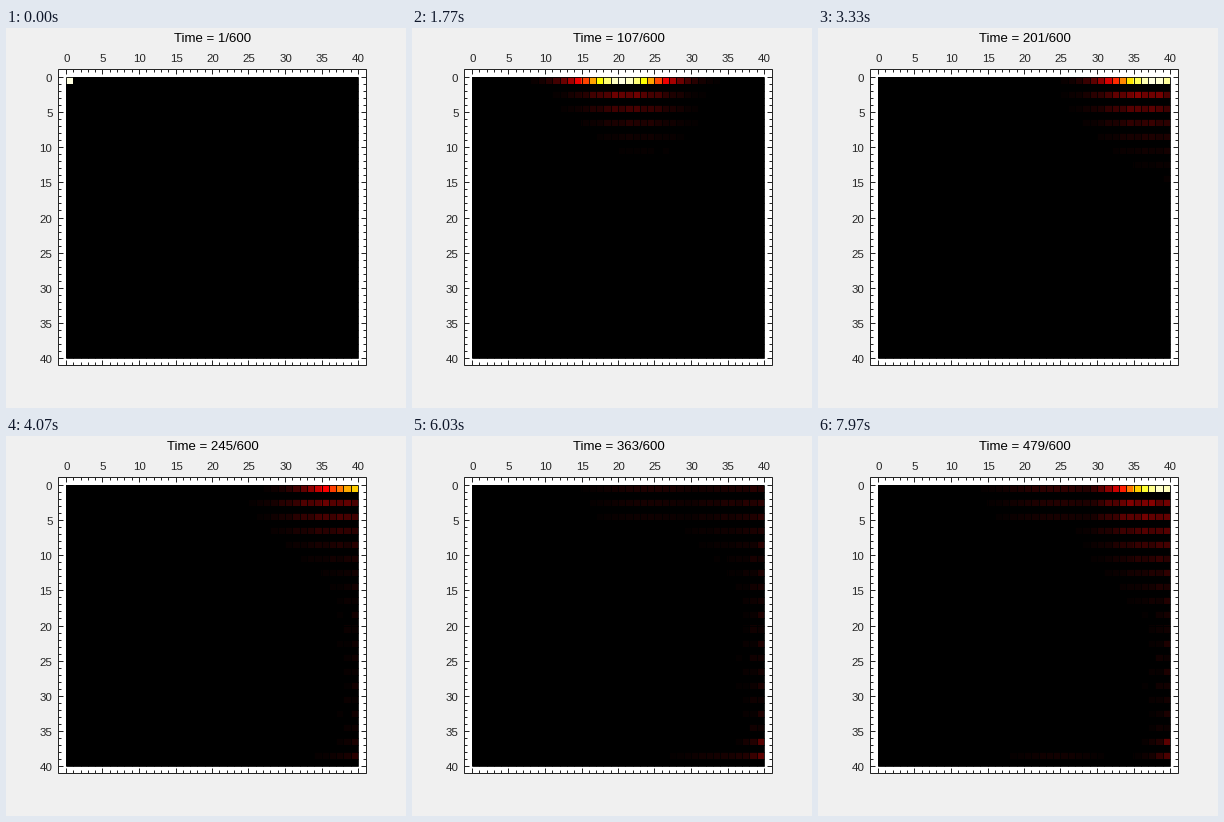
A matplotlib script that plays this animation: 400x380 px, repeating every 8 s.

```python
import numpy as np
import matplotlib
import matplotlib.pyplot as plt
from matplotlib.animation import FuncAnimation

matplotlib.rcParams["font.family"] = "Liberation Sans"

W, H, DPI = 400, 380, 100
FRAMES, INTERVAL = 400, 20
N = 40
X0, Y0, X1, Y1 = 60, 49, 352, 330
LEFT, TOP, RIGHT, BOTTOM = 52, 41, 360, 337
INK = "#262626"

col = np.arange(N)
C, R = np.meshgrid(col, col)


def bell(x, width):
    return np.exp(-0.5 * (x / width) ** 2)


def ramp(t, start, length):
    return np.clip((t - start) / length, 0, 1)


def bulk(t, vx, vy, strength):
    """Faint packet crossing the interior in a checkered pattern."""
    cx, cy = vx * t, vy * t
    spread = 0.3 + 0.05 * t
    checker = (C + (R > cy)) % 2 == 0
    power = min(0.25, strength * 39 / t) * ramp(t, 1, 4)
    return power * checker * bell(C - cx, spread * 0.8) * bell(R - cy, spread * 1.3)


def field(t):
    # The packet runs along the top row, then breathes in the right corner
    phase = 2 * np.pi * max(0, t - 205) / 260
    breath = 0.5 + 0.5 * np.cos(phase)
    mu = min(max(0, 0.22 * (t - 16)), 37.3 + 3.2 * np.sin(phase))
    width = 0.15 + 4.05 * (1 - np.exp(-(t / 18) ** 1.5)) + 1.5 * (1 - breath)
    peak = 0.97 * breath ** 1.5
    side = (0.04 + 0.17 * breath ** 1.5) * (1 - np.exp(-(t - 1) / 60))
    depth = 1.4 + t / 250

    z = bulk(t, 0.45, 0.44, 0.085) + bulk(t, 0.53, 0.83, 0.03)
    z[0] = peak * bell(col - mu, width)

    # Weaker copies on every other row
    for k in range(1, 9):
        centre = min(mu + 0.6 * k, 35 + 0.4 * k)
        ripple = 0.88 + 0.12 * np.cos(2.1 * col + k - 0.15 * t)
        fall = np.exp(-((k - 1) / depth) ** 1.3)
        z[2 * k] += side * fall * ripple * bell(col - centre, width)
    for k in range(3):
        tail = 0.07 * ramp(t, 300, 100) * (1 - 0.25 * k)
        z[2 * k] = np.maximum(z[2 * k], tail * bell(col - 24, 5))

    # Right edge, bottom edge and far corner
    wobble = 0.7 + 0.3 * np.cos(1.3 * R + 2.6 * C - 0.1 * t)
    reach = ramp((t - 160) / 2 - R, 0, 6)
    edge = 0.045 * ramp(t, 180, 100)
    z += edge * (R % 2 == 0) * wobble * reach * np.exp((C - N + 1) / 1.8)
    corner = 0.09 * ramp(t, 230, 60)
    z[36] += corner * np.exp((col - N + 1) / 1.2)
    z[38] += corner * np.exp((col - N + 1) / 1.6)
    z[38] += 0.6 * edge * bell(col - 39 + 0.08 * max(t - 291, 0), 4)
    return np.where(z < 0.008, 0, np.clip(z, 0, 1))


def heat(z):
    rgb = np.stack([z / .375, (z - .375) / .375, (z - .75) / .25], axis=-1)
    return np.clip(rgb, 0, 1)


def px(n):
    return n * 72 / DPI


fig = plt.figure(figsize=(W / DPI, H / DPI), dpi=DPI, facecolor="#f0f0f0")
ax = fig.add_axes([0, 0, 1, 1])
ax.axis("off")

ax.add_patch(plt.Rectangle((LEFT, TOP), RIGHT - LEFT, BOTTOM - TOP,
                           fc="white", ec=INK, lw=px(1), zorder=0))
img = ax.imshow(heat(field(1)), extent=(X0, X1, Y1, Y0), aspect="auto",
                interpolation="nearest", zorder=1)

grid_x = np.round(np.linspace(X0, X1, N + 1))
grid_y = np.round(np.linspace(Y0, Y1, N + 1))
mesh = dict(colors="black", lw=px(1), alpha=0.85, zorder=2)
ax.vlines(grid_x, Y0, Y1, **mesh)
ax.hlines(grid_y, X0, X1, **mesh)

size = np.where(np.arange(N + 1) % 5 == 0, 5, 3)
tick = dict(colors=INK, lw=px(1), zorder=3)
ax.vlines(grid_x, TOP, TOP + size, **tick)
ax.vlines(grid_x, BOTTOM - size, BOTTOM, **tick)
ax.hlines(grid_y, LEFT, LEFT + size, **tick)
ax.hlines(grid_y, RIGHT - size, RIGHT, **tick)

label = dict(fontsize=px(11.5), color=INK, va="baseline")
for n in range(0, N + 1, 5):
    ax.text(grid_x[n] + 0.5, 33.5, str(n), ha="center", **label)
    ax.text(46.5, grid_y[n] + 5, str(n), ha="right", **label)
title = ax.text(206.5, 14.5, "", fontsize=px(13.3), color="black",
                ha="center", va="baseline")

ax.set_xlim(0, W)
ax.set_ylim(H, 0)


def update(i):
    # The counter gains 2 thirty times a second, on a 10 ms clock
    t = 1 + 2 * int((2 * i + 1.5) * 0.3)
    img.set_data(heat(field(t)))
    title.set_text(f"Time = {t}/600")
    return img, title


anim = FuncAnimation(fig, update, frames=FRAMES, interval=INTERVAL,
                     repeat=True, repeat_delay=0)
plt.show()
```
